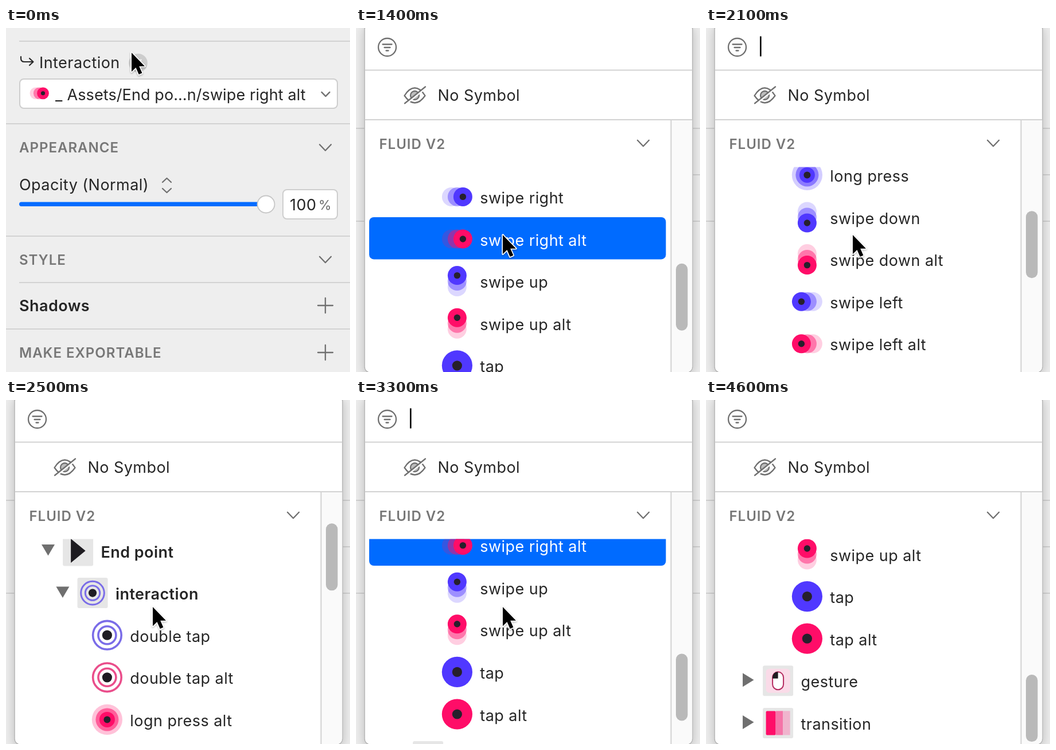
An HTML page that plays this animation: 600x600 px, repeating every 4900 ms.

```html
<!DOCTYPE html>
<html lang="en">
<head>
<meta charset="utf-8">
<title>Symbol picker</title>
<style>
  html, body { margin: 0; width: 100%; height: 100%; overflow: hidden; background: #eee; }
  svg { display: block; width: 100vw; height: 100vh; }
  text { font: 400 27px Inter, "Liberation Sans", sans-serif; letter-spacing: .45px; fill: #262626; white-space: pre; }
  .bold { font-weight: 600; }
  .head { font-size: 24px; font-weight: 600; letter-spacing: 1px; fill: #777; }
  .tight { letter-spacing: .1px; }
  .unit { font-size: 23px; fill: #6a6a6a; }
  .on { fill: #fff; }
  .rule { stroke: #d2d2d2; stroke-width: 2; }
  .box { fill: #fff; stroke: #cecece; stroke-width: 2; }
  .line { fill: none; stroke: #707070; stroke-width: 2.3; stroke-linecap: round; stroke-linejoin: round; }
</style>
</head>
<body>
<svg id="stage" viewBox="0 0 600 600" xmlns="http://www.w3.org/2000/svg"></svg>
<script>
const LOOP = 4900, STEP = 100, OPEN = 400, PAN = 188, ROW = 73.6;
const PURPLE = '#5038ff', PINK = '#ff0d68', DARK = '#27202c';

const text = (x, y, str, cls = '') => `<text x="${x}" y="${y}" class="${cls}">${str}</text>`;
const rule = (y, x1 = 0, x2 = 600) => `<path class="rule" d="M${x1} ${y}H${x2}"/>`;
const line = d => `<path class="line" d="${d}"/>`;
const disc = (x, y, r, fill, opacity = 1) =>
  `<circle cx="${x}" cy="${y}" r="${r}" fill="${fill}" opacity="${opacity}"/>`;
const ring = (r, color, width) =>
  `<circle r="${r}" fill="none" stroke="${color}" stroke-width="${width}"/>`;
const rect = (x, y, w, h, fill, rx = 0) =>
  `<rect x="${x}" y="${y}" width="${w}" height="${h}" rx="${rx}" fill="${fill}"/>`;
const at = (x, y, body, scale = 1) =>
  `<g transform="translate(${x} ${y}) scale(${scale})">${body}</g>`;
const chevron = (x, y, w = 10, h = 5.2) => line(`M${x - w} ${y - h}L${x} ${y + h}L${x + w} ${y - h}`);
const plus = (x, y) => line(`M${x - 13} ${y}h26M${x} ${y - 13}v26`);

// Row icons, centred on 0,0
const swipe = (dx, dy, color) =>
  disc(-dx * 10, -dy * 10, 16.5, color, .2) +
  disc(0, 0, 16.5, color, .45) +
  disc(dx * 10, dy * 10, 16.5, color) +
  disc(dx * 10, dy * 10, 5.7, DARK);
const tap = color => disc(0, 0, 26.6, color) + disc(0, 0, 8.6, DARK);
const rings = color => ring(24.8, color, 3.6) + ring(15.5, color, 3.6) + disc(0, 0, 8.6, '#1e1c23');
const press = color =>
  disc(0, 0, 26.6, color, .25) + disc(0, 0, 20, color, .55) +
  disc(0, 0, 13.5, color) + disc(0, 0, 6, DARK);
const tile = rect(-26.5, -26.5, 53, 53, '#e6e6e6', 3);
const endPoint = tile + '<path d="M-12.5-21L13 0L-12.5 21Z" fill="#1e1c21"/>';
const interaction = tile + at(0, 0, rings('#7a6ce8'), .82);
const gesture = tile + rect(-21, -21, 42, 42, '#fadbe8', 6) +
  '<rect x="-9.5" y="-15.5" width="19" height="31" rx="9.5" fill="#fff" stroke="#b52b60" stroke-width="2"/>' +
  '<path d="M0-15.5V-4H-9.5V-7A9 9 0 0 1 0-15.5Z" fill="#1e1c21"/>';
const transition = tile + rect(-21, -21, 17, 42, PINK, 2) +
  rect(-4, -21, 12.5, 42, '#f573a8') + rect(8.5, -21, 12.5, 42, '#f0b4cd');

// [label, icon, indent level, arrow]
const rows = [
  ['End point', endPoint, 0, 'down'],
  ['interaction', interaction, 1, 'down'],
  ['double tap', rings('#7a6ce8'), 2],
  ['double tap alt', rings('#ea4e8b'), 2],
  ['logn press alt', press(PINK), 2],
  ['long press', press(PURPLE), 2],
  ['swipe down', swipe(0, 1, PURPLE), 2],
  ['swipe down alt', swipe(0, 1, PINK), 2],
  ['swipe left', swipe(-1, 0, PURPLE), 2],
  ['swipe left alt', swipe(-1, 0, PINK), 2],
  ['swipe right', swipe(1, 0, PURPLE), 2],
  ['swipe right alt', swipe(1, 0, PINK), 2],
  ['swipe up', swipe(0, -1, PURPLE), 2],
  ['swipe up alt', swipe(0, -1, PINK), 2],
  ['tap', tap(PURPLE), 2],
  ['tap alt', tap(PINK), 2],
  ['gesture', gesture, 0, 'right'],
  ['transition', transition, 0, 'right'],
];
const SELECTED = 11;
const arrows = { down: 'M-11.5-9.5h23L0 10Z', right: 'M-9.5-12L10 0L-9.5 12Z' };

// The selected row sits at y = 0, the others around it
const drawRow = ([label, icon, level, arrow], i) => {
  const x = level * 25.4;
  const chosen = i === SELECTED;
  return at(0, (i - SELECTED) * ROW,
    (chosen ? rect(23, -40, 517.5, 73.4, '#006bff', 8) : '') +
    (arrow ? at(73.5 + x, -3.5, `<path d="${arrows[arrow]}" fill="#6f6f6f"/>`) : '') +
    at(125.6 + x, -2, icon) +
    text(165.5 + x, 9.6, label, chosen ? 'on' : arrow === 'down' ? 'bold' : ''));
};

const panel =
  rule(23, 23) + rule(167) + rule(363) + rule(444, 23) + rule(525) +
  `<path d="M26 50v3q0 6 6 6h15m-6-6l6.500 6l-6.500 6" fill="none" stroke="#2a2a2a" stroke-width="2.2" stroke-linecap="round" stroke-linejoin="round"/>` +
  text(58, 70, 'Interaction') +
  `<g id="hint">${disc(230.5, 61, 16.3, '#cdcdcd')}<path d="M225 55l11 11m0-11l-11 11" stroke="#fff" stroke-width="2.500"/></g>` +
  '<rect class="box" x="24" y="89" width="554" height="51" rx="7"/>' +
  at(58.2, 113.800, swipe(1, 0, PINK), .63) +
  text(86, 126, '_') + text(106.5, 126, 'Assets/End po…n/swipe right alt', 'tight') +
  chevron(557.5, 115.5, 7, 3.6) +
  text(23, 217, 'APPEARANCE', 'head') + chevron(557, 208.5) +
  text(23, 283, 'Opacity (Normal)') +
  line('M273 269l7.500-7l7.500 7M273 280l7.500 7l7.500-7') +
  rect(23, 303.500, 430, 7.5, '#066cff', 3.700) +
  '<circle cx="453.500" cy="307.500" r="15" fill="#fff" stroke="#c6c6c6" stroke-width="1.800"/>' +
  '<rect class="box" x="483" y="282" width="95" height="51" rx="7"/>' +
  text(495, 318, '100') + text(545, 316.500, '%', 'unit') +
  text(23, 412.500, 'STYLE', 'head') + chevron(557, 404) +
  text(23, 493.500, 'Shadows', 'bold') + plus(557, 484) +
  text(23, 575, 'MAKE EXPORTABLE', 'head') + plus(557, 566);

const popup =
  '<rect x="15" y="-8" width="572" height="609" rx="10" fill="#fff" stroke="#b4b4b4" stroke-width="1.500" filter="url(#soft)"/>' +
  '<g clip-path="url(#window)">' +
  '<circle class="line" cx="54.500" cy="33.500" r="15.500"/>' +
  line('M46.500 28.500h16M49.500 34h10M52.500 39.500h4') +
  `<g id="caret">${rect(94, 14.500, 2.600, 35, '#000')}</g>` +
  rule(73.500, 15, 587) + rule(160, 15, 587) +
  line('M84.500 118Q93 104.500 102.500 104.500T120.500 118Q112 130.500 102.500 130.500T84.500 118Z') +
  '<circle class="line" cx="102.500" cy="117.500" r="7.500" style="fill:#bdbdbd"/>' +
  '<path d="M87 133L123 104" stroke="#fff" stroke-width="2.500"/>' + line('M85 131.500L121 102.500') +
  text(142.500, 127, 'No Symbol') +
  text(40.500, 210.500, 'FLUID V2', 'head') + chevron(501, 201) +
  rect(549, 161, 38, 440, '#fafafa') +
  '<path class="rule" d="M549.500 161V601"/>' +
  `<g id="thumb">${rect(558, 0, 20.500, 117, '#b9b9b9', 10.200)}</g>` +
  `<g clip-path="url(#list)"><g id="rows">${rows.map(drawRow).join('')}</g></g></g>`;

const pointer = '<path d="M0 0V33.300L7.500 26.100L12.700 38L18.400 35.600L13.200 23.700H23Z" ' +
  'fill="#000" stroke="#fff" stroke-width="3.200" stroke-linejoin="round" paint-order="stroke" filter="url(#drop)"/>';

const $ = id => document.getElementById(id);
$('stage').innerHTML = `
  <defs>
    <filter id="soft" x="-10%" y="-10%" width="120%" height="120%">
      <feDropShadow dx="0" dy="5" stdDeviation="10" flood-opacity=".22"/>
    </filter>
    <filter id="drop" x="-50%" y="-50%" width="200%" height="200%">
      <feDropShadow dx="0" dy="1.500" stdDeviation="1.500" flood-opacity=".3"/>
    </filter>
    <clipPath id="window"><rect x="15.700" y="-7" width="570.600" height="607" rx="9"/></clipPath>
    <clipPath id="list"><rect x="15" y="242.500" width="533" height="360"/></clipPath>
  </defs>
  ${rect(0, 0, 600, 600, '#eee')}
  <g id="panel">${panel}</g>
  <g id="popup">${popup}</g>
  <g id="pointer">${pointer}</g>`;

// [time, y of the selected row]
const scrollKeys = [
  [1000, 549.6], [1400, 370], [1600, 370], [1800, 455.6], [2100, 700],
  [2500, 1074.6], [2600, 1074.6], [3000, 651.6], [3300, 255.6], [3600, 150], [3900, 123.8],
];

// Cubic interpolation through the keys, at rest on turning points
function follow(keys, t) {
  const last = keys.length - 1;
  if (t <= keys[0][0]) return keys[0][1];
  if (t >= keys[last][0]) return keys[last][1];
  const slope = i => (keys[i + 1][1] - keys[i][1]) / (keys[i + 1][0] - keys[i][0]);
  const tangent = i => {
    if (i === 0 || i === last) return 0;
    const a = slope(i - 1), b = slope(i);
    return a * b <= 0 ? 0 : 2 * a * b / (a + b);
  };
  const i = keys.findIndex(k => k[0] > t) - 1;
  const [t0, y0] = keys[i], [t1, y1] = keys[i + 1];
  const d = t1 - t0, u = (t - t0) / d, v = 1 - u;
  return y0 * (1 + 2 * u) * v * v + tangent(i) * d * u * v * v +
         y1 * u * u * (3 - 2 * u) - tangent(i + 1) * d * u * u * v;
}

const move = (id, x, y) => $(id).setAttribute('transform', `translate(${x} ${y})`);
const show = (id, on) => $(id).setAttribute('visibility', on ? 'inherit' : 'hidden');

function pointerAt(t, glide) {
  if (t < 100) return [219, 43];
  if (t >= 4000) return [256, 361 + (t - 3900) * .6];
  return [437 - 181 * glide, 103 + 258 * glide];
}

function render(time) {
  const t = Math.floor(time / STEP) * STEP;
  const u = Math.min(1, Math.max(0, (t - OPEN) / 500));
  const glide = u * u * (3 - 2 * u);
  const y = follow(scrollKeys, t);

  show('hint', t < 100);
  move('panel', 0, -PAN * glide);
  show('popup', t >= OPEN);
  move('popup', 0, PAN * (1 - glide));
  move('rows', 0, y);
  move('thumb', 0, 361 + (549.6 - y) / 3.605);
  show('caret', t >= 900 && (t - 900) % 1100 < 500 && t < 4600);
  move('pointer', ...pointerAt(t, glide));
  show('pointer', t < 4300);
}

const start = performance.now();
(function tick() {
  render((performance.now() - start) % LOOP);
  requestAnimationFrame(tick);
})();
</script>
</body>
</html>
```
